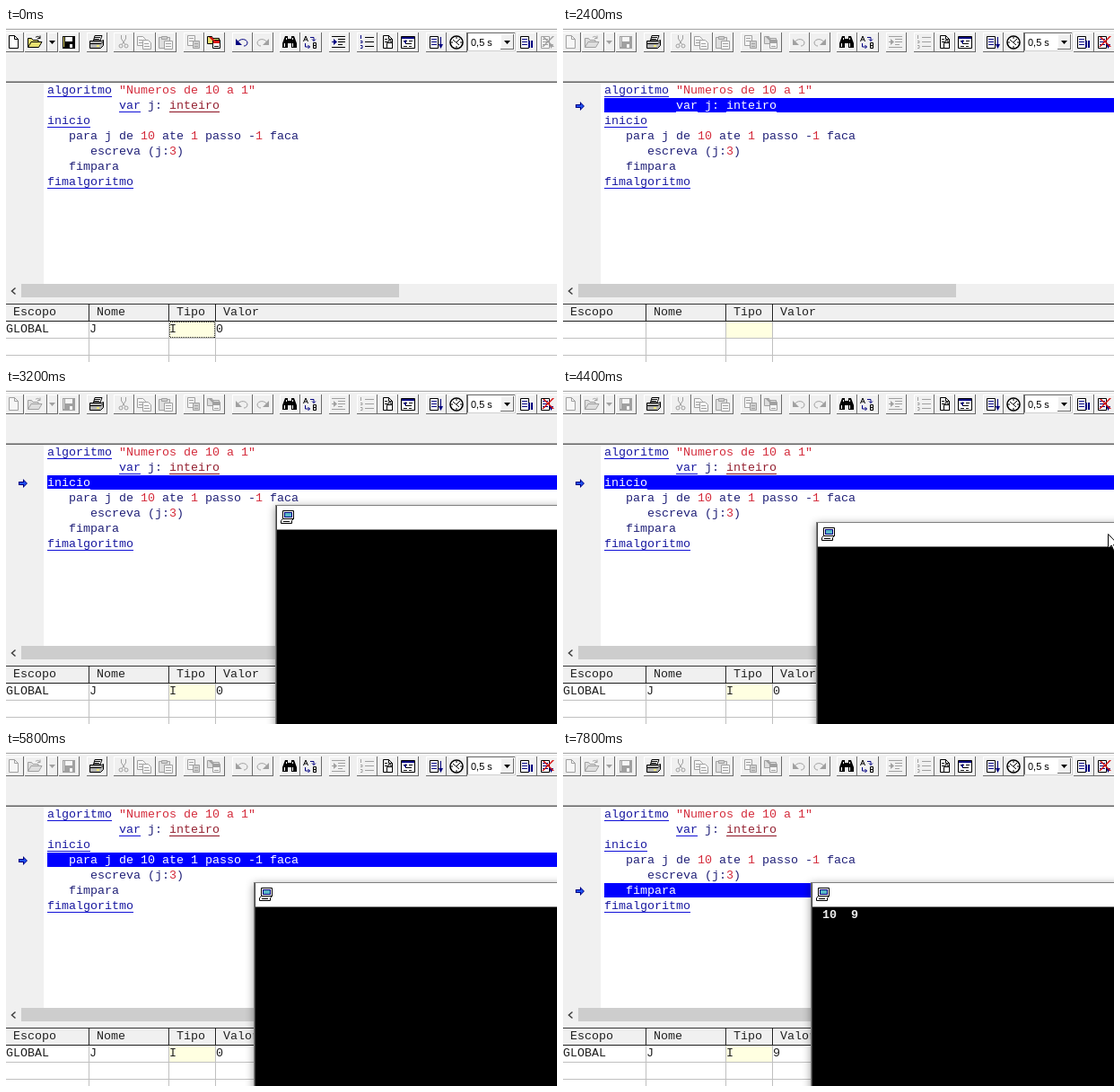
An HTML page that plays this animation: 614 by 372 pixels, repeating every 8000 ms.

```html
<!DOCTYPE html>
<html lang="pt">
<head>
<meta charset="utf-8">
<title>Passo a passo</title>
<style>
html, body { margin: 0; width: 100%; height: 100%; overflow: hidden; background: #f0f0f0; }
svg { display: block; width: 614px; height: 372px; }
rect { shape-rendering: crispEdges; }
text { font: 13.333px "Liberation Mono", "Courier New", monospace; white-space: pre; fill: #202020; }
#stage { --k: #000; --w: #fff; --y: #e8e070; --b: #000080; --r: #d81010; --g: #b4b4b4; }
#stage .off { --k: #a0a0a0; --w: #f6f6f6; --y: #dedede; --b: #a0a0a0; --r: #a0a0a0; --g: #cfcfcf; }
.K, .B, .R { fill: none; }
.k { fill: var(--k); } .w { fill: var(--w); } .y { fill: var(--y); }
.b { fill: var(--b); } .r { fill: var(--r); } .g { fill: var(--g); }
.K { stroke: var(--k); } .B { stroke: var(--b); } .R { stroke: var(--r); }
.key { fill: #1818a0; } .id { fill: #202078; } .num { fill: #d42c3c; } .type { fill: #942030; }
.key.u { --line: #1010d8; } .type.u { --line: #8c1020; }
rect.u { fill: var(--line); }
.hot text, .hot rect { fill: #fff; }
#out { fill: #eee; font-weight: bold; }
#combo { font: 11px "Liberation Sans", Arial, sans-serif; fill: #000; }
#win { filter: drop-shadow(0 2px 5px rgba(0, 0, 0, .4)); }
</style>
</head>
<body>
<svg id="stage" viewBox="0 0 614 372"></svg>
<script>
const stage = document.getElementById('stage');
const LOOP = 8000, TICK = 200;
const lineY = n => 61 + 17 * n;

const rect = (x, y, w, h, fill, more = '') =>
  `<rect x="${x}" y="${y}" width="${w}" height="${h}" fill="${fill}" ${more}/>`;
const text = (x, y, s, more = '') => `<text x="${x}" y="${y}" ${more}>${s}</text>`;
const path = (cls, d) => `<path class="${cls}" d="${d}"/>`;
const group = (id, body, more = '') => `<g id="${id}" ${more}>${body}</g>`;

// Bevelled frame: light on the top left, dark on the bottom right
const bevel = (x, y, w, h, light = '#fff', dark = '#696969') =>
  rect(x, y, w, 1, light) + rect(x, y, 1, h, light) +
  rect(x, y + h - 1, w, 1, dark) + rect(x + w - 1, y, 1, h, dark);

// Icons on a 16 x 16 grid
const sheet = path('w K', 'M3.5.5h6l4 4v10h-10z') + path('K', 'M9.5.5v4h4');
const pages = path('w K', 'M.5 1.5h6l3 3v7h-9z') + path('K', 'M2 5.5h4M2 8.5h4') +
  path('w B', 'M6.5 5.5h6l3 3v7h-9z') + path('B', 'M8 9.5h5M8 12.5h6');
const doc = path('w K', 'M1.5 1.5h9v13h-9z') + path('B', 'M3 4.5h6M3 7.5h6M3 10.5h6');
const frame = path('w K', 'M.5 1.5h15v13h-15z');

const icons = {
  new: sheet,
  open: path('y K', 'M.5 13.5v-10h4l1.5 2h6v3') + path('y K', 'M.5 13.5l3.5-6h12l-3.5 6z') +
    path('K', 'M9 2.5c2-2 4-1 5 1m0-3v3h-3'),
  drop: path('k', 'M0 6h7l-3.5 4z'),
  save: path('k', 'M1 1h14v14h-14z') + path('w', 'M4 2h8v5h-8zM9 10h3v4h-3z') + path('y', 'M2 2h1v11h-1z'),
  print: path('w K', 'M4.5 6l1.5-5.5h8l-2 5.5z') + path('g K', 'M.5 6.5h13l2-1v6l-3 3h-12z') +
    path('K', 'M6 2.5h6M5 4.5h6M1 9.5h12l2-2') + path('y', 'M8 11h3v2h-3z'),
  cut: path('K', 'M5.5 0v4l4 6m1-10v4l-4 6') + path('K', 'M3 12a2 2 0 1 0 4 0a2 2 0 1 0-4 0M9 12a2 2 0 1 0 4 0a2 2 0 1 0-4 0'),
  copy: pages,
  paste: path('y K', 'M.5 2.5h12v12h-12z') + path('g K', 'M3.5 1.5h6v3h-6z') +
    path('w B', 'M6.5 6.5h9v9h-9z') + path('B', 'M8 9.5h6M8 12.5h6'),
  move: path('w K', 'M1.5.5h8v11h-8z') + path('K', 'M3 3.5h5M3 6.5h5') + path('g K', 'M7.5 6.5h7v8h-7z') + path('K', 'M9 9.5h4M9 12.5h4'),
  send: path('y K', 'M.5 1.5h5l1 2h7v6h-13z') + path('w K', 'M6.5 5.5h8v9h-8z') +
    path('r', 'M7 6h7v3h-7zM2 2h3l4 4h-3z') + path('K', 'M8 12.5h5'),
  undo: path('B', 'M3 8c3-5 10-4 11 0c0 3-2 4-4 4') + path('b', 'M1 4v7h7z'),
  redo: path('B', 'M13 8c-3-5-10-4-11 0c0 3 2 4 4 4') + path('b', 'M15 4v7h-7z'),
  find: path('k', 'M3 1h3v3h4v-3h3l3 8v5h-6v-5h-4v5h-6v-5z') + path('w', 'M4 3h1v2h-1zM11 3h1v2h-1zM2 9h1v4h-1zM11 9h1v4h-1z'),
  swap: path('K', 'M.5 7l2.5-6l2.5 6M1.5 5h3M11.5 8.5v6h3v-3h-3h3v-3z') +
    path('B', 'M8 2.5h4v4m-2-2l2 2l2-2M2.5 9v4h5m-2-2l2 2l-2 2'),
  indent: path('K', 'M0 1.5h15M7 4.5h8M7 7.5h8M7 10.5h5M0 13.5h15') + path('B', 'M0 7.5h5') + path('b', 'M2 4l4 3.5l-4 3.5z'),
  list: path('K', 'M6 2.5h10M6 7.5h10M6 12.5h10') + path('B', 'M1.5 0v4M1 6.5h2v2h-2M1 11.5h2v3h-2'),
  view: sheet + path('K', 'M5 4.5h3M5 7.5h3') + path('w K', 'M7.5 8.5h6v6h-6zM9 8v-2h3v2'),
  form: frame + path('b', 'M1 2h14v2h-14z') + path('K', 'M3 6.5h4M9 6.5h4M5 9.5h7M3 12.5h4M9 12.5h3') + path('b', 'M3 7l3-2v5z'),
  run: doc + path('B', 'M13.5 2v11') + path('b', 'M11 10h5l-2.5 5z'),
  clock: '<circle class="w K" cx="8" cy="8" r="7" stroke-width="1.6"/>' +
    path('K', 'M4 5l7 6M8 8l4-4M8 2v2M8 12v2M2 8h2M12 8h2'),
  step: doc + path('b', 'M10 6h2v8h-2zM13 6h2v8h-2z'),
  stop: doc + path('b', 'M10 10h5l-2.5 5z') + path('r', 'M3 2h2l4 4l5-5h2l-6 6l6 6h-2l-5-5l-5 5h-2l6-6z')
};

// name, left edge, width, when greyed: 1 always, 2 idle only, 3 running only
const buttons = [
  ['new', -3, 23, 3], ['open', 21, 25, 3], ['drop', 46, 12, 3], ['save', 59, 23, 3], ['print', 90, 23],
  ['cut', 120, 23, 1], ['copy', 143, 24, 1], ['paste', 167, 23, 1], ['move', 198, 23, 1], ['send', 221, 23, 3],
  ['undo', 252, 23, 3], ['redo', 275, 23, 1], ['find', 305, 23], ['swap', 328, 24], ['indent', 360, 23, 3],
  ['list', 391, 23, 3], ['view', 414, 23], ['form', 437, 23], ['run', 468, 23], ['clock', 491, 23],
  ['step', 569, 23], ['stop', 592, 23, 2]
];
const toolbar = buttons.map(([name, x, w]) =>
  bevel(x, 5, w, 22) + group('i-' + name, icons[name], `transform="translate(${x + (name === 'drop' ? 2 : 3)} 8)"`)
).join('');

const combo = rect(514, 5, 54, 21, '#fff') + bevel(514, 5, 54, 21, '#696969', '#d0d0d0') +
  text(518, 20, '0,5 s', 'id="combo"') +
  rect(551, 7, 15, 17, '#f0f0f0') + bevel(551, 7, 15, 17) + path('k', 'M555 14h7l-3.5 4z');

// Code lines: column, text, classes
const code = [
  [[0, 'algoritmo', 'key u'], [10, '"Numeros de 10 a 1"', 'num']],
  [[10, 'var', 'key u'], [14, 'j:', 'id'], [17, 'inteiro', 'type u']],
  [[0, 'inicio', 'key u']],
  [[3, 'para j de', 'id'], [13, '10', 'num'], [16, 'ate', 'id'], [20, '1', 'num'],
   [22, 'passo -', 'id'], [29, '1', 'num'], [31, 'faca', 'id']],
  [[6, 'escreva (j:', 'id'], [17, '3', 'num'], [18, ')', 'id']],
  [[3, 'fimpara', 'id']],
  [[0, 'fimalgoritmo', 'key u']]
];
const listing = code.map((tokens, n) => group('line' + n, tokens.map(([col, s, cls]) => {
  const x = 46 + col * 8, y = lineY(n) + 12;
  return text(x, y, s, `class="${cls}"`) +
    (cls.endsWith('u') ? rect(x, y + 3, s.length * 8, 1, 'none', 'class="u"').replace('"u"', `"${cls} line"`) : '');
}).join(''))).join('');

const columns = [92, 181, 233];
const table = rect(0, 307, 614, 1, '#303030') +
  rect(0, 308, 614, 18, '#f0f0f0') + rect(0, 308, 614, 1, '#fff') + rect(0, 326, 614, 46, '#fff') +
  rect(182, 327, 51, 18, '#ffffe1') +
  [345, 364].map(y => rect(0, y, 614, 1, '#c0c0c0')).join('') +
  columns.map(x => rect(x, 327, 1, 45, '#c0c0c0') + rect(x, 307, 1, 19, '#202020') + rect(x + 1, 308, 1, 18, '#fff')).join('') +
  rect(0, 326, 614, 1, '#202020') +
  [[8, 'Escopo'], [101, 'Nome'], [190, 'Tipo'], [242, 'Valor']].map(([x, s]) => text(x, 320, s)).join('') +
  group('vars', text(0, 339, 'GLOBAL') + text(93, 339, 'J') + text(182, 339, 'I') + text(234, 339, '0', 'id="value"')) +
  rect(182.5, 327.5, 50, 17, 'none', 'id="focus" stroke="#202020" stroke-dasharray="1 1"');

const pc = '<g transform="translate(5 5)">' + path('w K', 'M2.5.5h12v9h-12z') + path('b', 'M4 2h9v6h-9z') +
  '<path d="M5 3h7v4h-7z" fill="#58b8c8"/>' + path('w K', 'M.5 11.5l2-2h12l-2 2v3h-12z') + path('K', 'M3 12.5h7') + '</g>';
const terminal = rect(-1, -1, 700, 400, '#808080') + rect(0, 0, 700, 400, '#404040') + rect(1, 0, 700, 26, '#fff') +
  rect(1, 26, 700, 1, '#808080') + rect(1, 27, 700, 400, '#000') + pc + text(4, 39, '', 'id="out"');

stage.innerHTML =
  rect(0, 0, 614, 372, '#f0f0f0') + rect(0, 1, 614, 1, '#a8a8a8') + rect(0, 2, 614, 1, '#fff') +
  toolbar + group('pressed', bevel(491, 5, 23, 22, '#505050', '#fff')) + combo +
  rect(0, 59, 614, 1, '#a0a0a0') + rect(0, 60, 614, 1, '#696969') +
  rect(42, 61, 572, 224, '#fff') +
  rect(46, 0, 568, 16, '#0000ff', 'id="bar"') + listing +
  group('arrow', path('b', 'M0 3h5v-3l5 5l-5 5v-3h-5z') + '<path d="M1 4h5v-2l3 3l-3 3v-2h-5z" fill="#2050f0"/>') +
  rect(45, 164, 2, 15, '#000', 'id="caret"') +
  rect(17, 285, 421, 15, '#cdcdcd') +
  '<path d="M10.5 289.5l-4 3.5l4 3.5" fill="none" stroke="#404040" stroke-width="1.5"/>' +
  table + group('win', terminal) +
  group('mouse', '<path d="M.5.5v16l3.7-3.5l2.5 5.7l2.3-1l-2.5-5.5h5.3z" fill="#fff" stroke="#000"/>');

// Underlines take the colour of their word
stage.querySelectorAll('rect.line').forEach(r => r.style.fill = 'var(--ink, var(--line))');

const $ = id => document.getElementById(id);
const show = (id, on) => $(id).setAttribute('visibility', on ? 'visible' : 'hidden');
const place = (id, x, y) => $(id).setAttribute('transform', `translate(${x} ${y})`);

// Value of the last step at or before t
const at = (t, steps) => steps.reduce((v, [from, next]) => t >= from ? next : v, steps[0][1]);

// Point on a polyline of [time, x, y]
function along(t, keys) {
  const i = keys.findIndex(k => k[0] > t);
  if (i < 0) return keys[keys.length - 1].slice(1);
  if (!i) return keys[0].slice(1);
  const [a, b] = [keys[i - 1], keys[i]], f = (t - a[0]) / (b[0] - a[0]);
  return [1, 2].map(n => Math.round(a[n] + (b[n] - a[n]) * f));
}

const current = [[0, -1], [1800, 0], [2400, 1], [2800, 2], [5400, 3], [6000, 4], [6400, 5], [6800, 3], [7400, 4], [7800, 5]];
const values = [[0, '0'], [6000, '10'], [7400, '9']];
const output = [[0, ''], [6400, ' 10'], [7800, ' 10  9']];
const mousePath = [[0, 640, 90], [200, 604, 70], [1000, 503, 9], [1600, 503, 9], [2200, 630, 60],
  [4200, 630, 160], [4400, 607, 160], [4800, 601, 158], [5200, 606, 158], [5400, 630, 160]];
const winPath = [[0, 301, 129], [4200, 301, 129], [4400, 283, 148], [4800, 277, 146]];

function draw(t) {
  const line = at(t, current), running = line >= 0;
  for (const [name, , , rule] of buttons)
    $('i-' + name).classList.toggle('off', rule === 1 || rule === 2 && !running || rule === 3 && running);
  code.forEach((_, n) => {
    $('line' + n).classList.toggle('hot', n === line);
    $('line' + n).style.setProperty('--ink', n === line ? '#fff' : 'initial');
  });
  show('bar', running);
  $('bar').setAttribute('y', lineY(line));
  show('arrow', running);
  place('arrow', 14, lineY(line) + 4);
  show('caret', !running && Math.floor((t + 400) / 600) % 2);
  show('pressed', t >= 1400 && t < 1800);
  show('focus', !running);
  show('vars', !running || line > 1);
  $('value').textContent = at(t, values);
  $('out').textContent = at(t, output);
  show('win', t >= 3000);
  place('win', ...along(t, winPath));
  place('mouse', ...along(t, mousePath));
}

const start = performance.now();
function loop() {
  const t = (performance.now() - start) % LOOP;
  draw(Math.floor(t / TICK) * TICK);
  requestAnimationFrame(loop);
}
loop();
</script>
</body>
</html>
```
